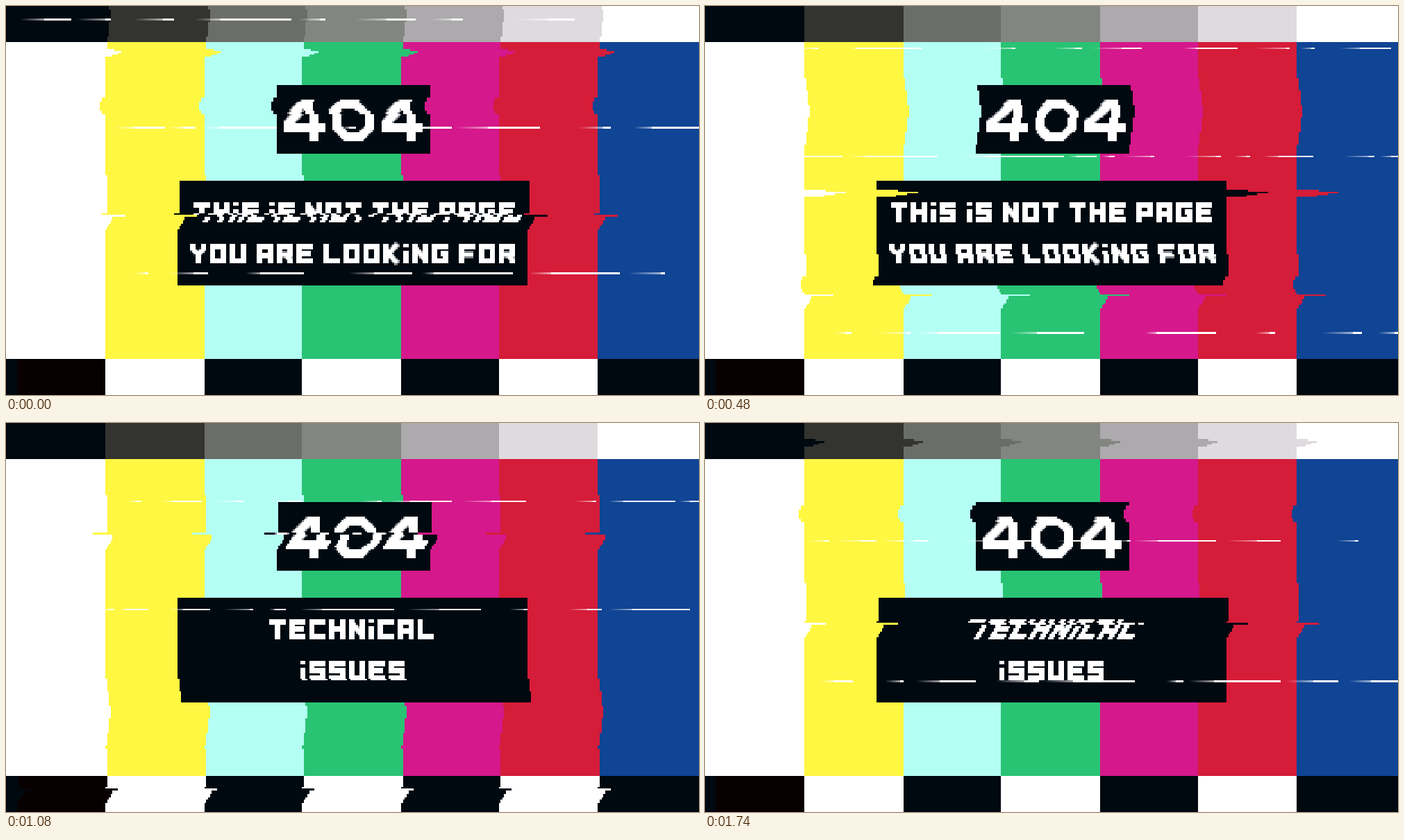
Animation of 998x561 px, one loop 1800 ms. Source, as an HTML page with a canvas:

```html
<!DOCTYPE html>
<html lang="en">
<head>
<meta charset="utf-8">
<title>404</title>
<style>
html, body { margin: 0; width: 100%; height: 100%; overflow: hidden; background: #000810; }
canvas { display: block; width: 100vw; height: 100vh; image-rendering: pixelated; }
</style>
</head>
<body>
<canvas id="screen" width="384" height="216" role="img"
  aria-label="404. This is not the page you are looking for. Technical issues"></canvas>
<script>
const W = 384, H = 216, STEP = 60, FRAMES = 30;
const DARK = '#000810', WHITE = '#fff';
const EDGES = [0, 55, 110, 164, 219, 273, 328, W];
const GREYS = [DARK, '#333430', '#6b6d69', '#828580', '#acaaac', '#dedade', WHITE];
const COLORS = [WHITE, '#fff741', '#b4fff4', '#29c374', '#d5188b', '#d51c39', '#104494'];
const FLOOR = ['#080000', WHITE, DARK, WHITE, DARK, WHITE, DARK];

// Centre lines of the letters in a 9 x 11 cell
const LETTERS = {
  T: 'M0 1.5H9M4.5 0V11',
  H: 'M1.5 0V11M7.5 0V11M3 5.5H6',
  i: 'M1.5 0V2M1.5 4V11',
  S: 'M9 1.5H1.5V5.5H7.5V9.5H0',
  N: 'M1.5 11V0M7.5 0V11M1.5 2L7.5 9',
  O: 'M1.5 1.5H7.5V9.5H1.5Z',
  P: 'M1.5 11V1.5H7.5V6.5H3',
  A: 'M1.5 11V1.5H7.5V11M3 6.5H6',
  G: 'M9 1.5H1.5V9.5H7.5V5.5H5',
  E: 'M9 1.5H1.5V9.5H9M3 5.5H8',
  Y: 'M1.5 0V3L4.5 6L7.5 3V0M4.5 5V11',
  U: 'M1.5 0V9.5H7.5V0',
  R: 'M1.5 11V1.5H7.5V6H3M5 6L7.5 9V11',
  L: 'M1.5 0V9.5H9',
  K: 'M1.5 0V11M8 0L3 5.5L8 11',
  F: 'M9 1.5H1.5V11M3 6H8',
  C: 'M9 1.5H1.5V9.5H9'
};
const DIGITS = {
  4: 'M16.5 23V2.5H13L2.5 13V15.5H23',
  0: 'M7.5 2.5H15.5L20.5 7.5V15.5L15.5 20.5H7.5L2.5 15.5V7.5Z'
};

// Tracks: [step, row, ...strengths]
const SCAN = [[-33, 1], [20, 107], [22, 114], [29, 143], [30, 148], [36, 173], [40, 188], [44, 205], [47, 217]];
const TEAR = [[10, 14, 0, -2], [14, 45, 9, -2], [18, 62, 4, -7], [22, 78, 22, -2], [29, 111, 12, 0],
  [30, 116, 11, -2], [36, 152, 18, 2], [40, 168, 14, -2], [44, 187, 9, -2], [48, 203, 7, 0], [52, 213, 7, 0], [55, 226, 7, 0]];
const SPIKE = [[-1, 10, 11], [0, 25, 9], [6, 85, 23], [10, 121, 23], [12, 139, 15]];
const BULGE = [[0, 5], [6, 38], [10, 77], [14, 104], [18, 160], [22, 205], [24, 230]];
const DENT = [[20, 4], [22, 14], [29, 50], [30, 55], [36, 130], [40, 178], [44, 206], [46, 222]];

function sample(track, n) {
  const i = track.findIndex(p => p[0] >= n);
  if (i < 0 || n < track[0][0]) return null;
  const b = track[i], a = track[i - 1] || b;
  const u = a === b ? 0 : (n - a[0]) / (b[0] - a[0]);
  return b.map((v, j) => Math.round(a[j] + (v - a[j]) * u));
}

// A track may outlast one loop, so earlier and later passes show together
const active = (track, k) =>
  [k - FRAMES, k, k + FRAMES].map(n => sample(track, n)).filter(Boolean);

function strokeAt(c, path, x, y, width) {
  c.save();
  c.translate(x, y);
  c.lineWidth = width;
  c.stroke(new Path2D(path));
  c.restore();
}

function write(c, text, y) {
  const advance = ch => ch === ' ' ? 4 : ch === 'i' ? 5 : 11;
  const width = [...text].reduce((sum, ch) => sum + advance(ch), -2);
  let x = Math.floor(W / 2 - width / 2);
  for (const ch of text) {
    if (ch !== ' ') strokeAt(c, LETTERS[ch], x, y, 3);
    x += advance(ch);
  }
}

function makeScene(lines) {
  const canvas = document.createElement('canvas');
  canvas.width = W;
  canvas.height = H;
  const c = canvas.getContext('2d');
  const rect = (color, x, y, w, h) => { c.fillStyle = color; c.fillRect(x, y, w, h); };
  const band = (colors, top, bottom) => colors.forEach((color, i) =>
    rect(color, EDGES[i], top, EDGES[i + 1] - EDGES[i], bottom - top));
  band(GREYS, 0, 20);
  band(COLORS, 20, 196);
  band(FLOOR, 196, H);
  rect(DARK, 0, 196, 6, 20);
  rect(DARK, 150, 44, 85, 38);
  rect(DARK, 95, 97, 194, 58);
  c.strokeStyle = WHITE;
  [...'404'].forEach((d, i) => strokeAt(c, DIGITS[d], 154 + 27 * i, 52, 5));
  lines.forEach((line, i) => write(c, line, 109 + 23 * i));
  return canvas;
}

const scenes = [
  makeScene(['THiS iS NOT THE PAGE', 'YOU ARE LOOKiNG FOR']),
  makeScene(['TECHNiCAL', 'iSSUES'])
];
const ctx = document.getElementById('screen').getContext('2d');
ctx.imageSmoothingEnabled = false;

function rowShifts(k) {
  const shifts = new Array(H).fill(0);
  const bend = (track, shape) => active(track, k).forEach(([, row, ...strength]) => {
    for (let y = 0; y < H; y++) shifts[y] += Math.round(shape(y - row, ...strength));
  });
  bend(BULGE, d => Math.max(0, 3 * (1 - Math.abs(d) / 22)));
  bend(DENT, d => Math.abs(d) < 5 ? -3 * Math.cos(d / 4) : 0);
  bend(SPIKE, (d, amp) => d === -1 ? amp / 2 : d >= 0 && d < 3 ? amp * (1 - 0.27 * d) : 0);
  bend(TEAR, (d, amp, kick) =>
    d === 0 ? amp : d === -1 ? kick : d > 0 && d < 8 ? 5 - 0.6 * d : d < 0 && d > -23 ? 1 : 0);
  return shifts;
}

function random(seed) {
  let s = (seed * 7919 + 104729) >>> 0;
  return () => {
    s = (s * 1664525 + 1013904223) >>> 0;
    return s / 4294967296;
  };
}

// Dashes with a fading tail on their left
function drawScan(n, y) {
  const rnd = random(n + 40);
  rnd();
  let x = rnd() * 20;
  while (x < W) {
    const tail = Math.round(3 + rnd() * 15);
    const body = Math.round(2 + rnd() ** 3 * 42);
    x = Math.round(x);
    const fade = ctx.createLinearGradient(x, 0, x + tail, 0);
    fade.addColorStop(0, '#fff0');
    fade.addColorStop(1, '#fff9');
    ctx.fillStyle = fade;
    ctx.fillRect(x, y, tail, 1);
    ctx.fillStyle = WHITE;
    ctx.fillRect(x + tail, y, body, 1);
    x += tail + body + 2 + rnd() ** 2 * 32;
  }
}

function draw(k) {
  const scene = scenes[k < 15 ? 0 : 1];
  ctx.drawImage(scene, 0, 0);
  rowShifts(k).forEach((dx, y) => {
    if (dx) ctx.drawImage(scene, 0, y, W, 1, dx, y, W, 1);
  });
  for (const n of [k - FRAMES, k, k + FRAMES]) {
    const scan = sample(SCAN, n);
    if (scan) drawScan(n, scan[1]);
  }
}

const start = performance.now();
function tick() {
  draw(Math.floor((performance.now() - start) / STEP) % FRAMES);
  requestAnimationFrame(tick);
}
tick();
</script>
</body>
</html>
```
